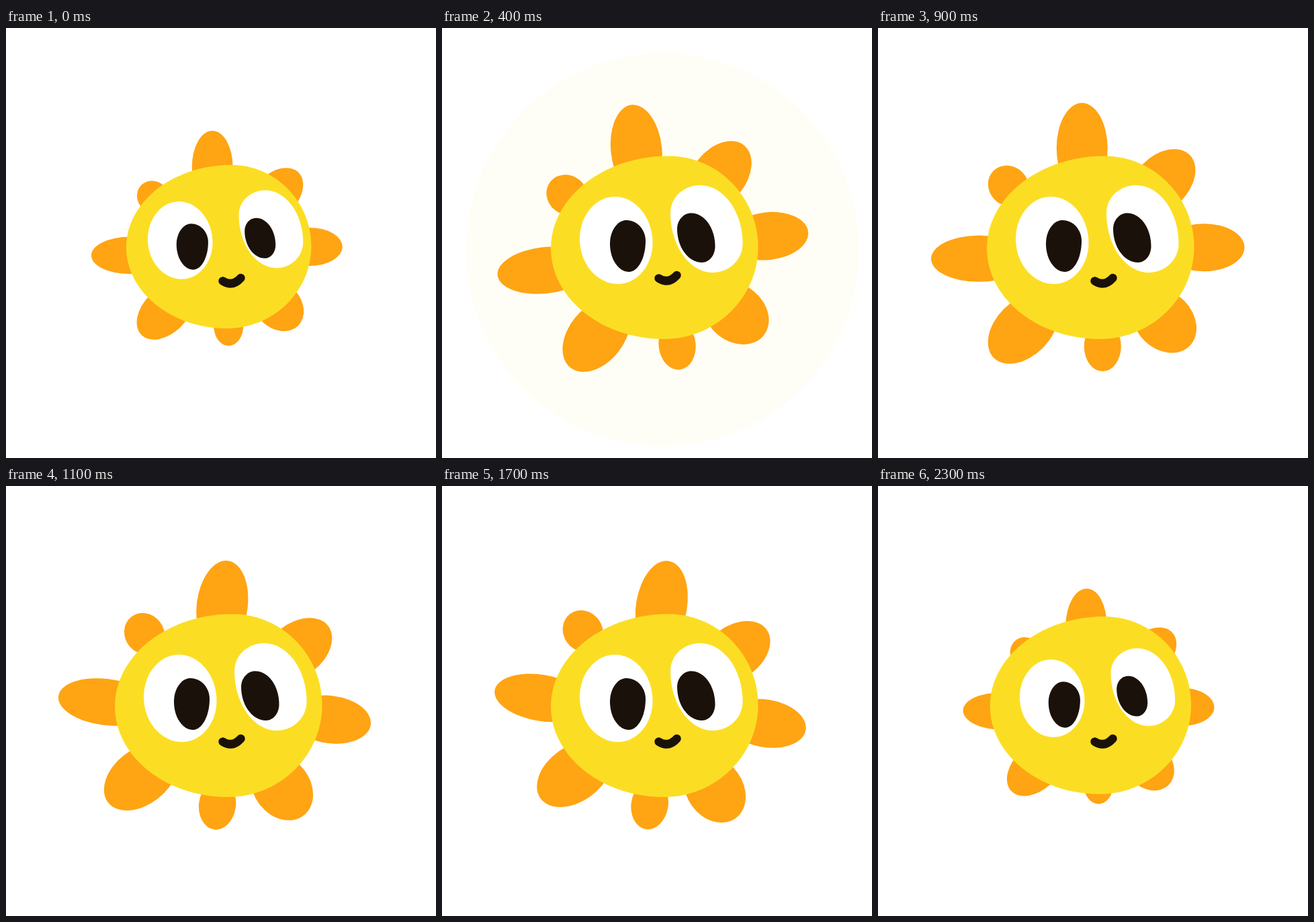
Recreate the animation shown at these times as an HTML page. Size 640 px wide and 640 px high, loop 2400 ms.

```html
<!DOCTYPE html>
<html lang="en">
<head>
<meta charset="utf-8">
<title>Sun</title>
<style>
  html, body { margin: 0; width: 100%; height: 100%; overflow: hidden; background: #fff; }
  svg { display: block; width: 100vw; height: 100vh; }
</style>
</head>
<body>
<svg viewBox="0 0 640 640"></svg>
<script>
  const LOOP = 2400, STEP = 100;
  const YELLOW = '#fbde23', ORANGE = '#ffa413', BLACK = '#1b110b';
  const svg = document.querySelector('svg');

  function set(el, attrs) {
    for (const key in attrs) el.setAttribute(key, attrs[key]);
  }

  function add(tag, attrs, parent = svg) {
    const el = document.createElementNS('http://www.w3.org/2000/svg', tag);
    set(el, attrs);
    return parent.appendChild(el);
  }

  // A lopsided oval given by its four extreme points.
  function oval(fill, top, right, bottom, left) {
    const k = 0.55;
    const mix = (a, b) => a + (b - a) * k;
    const quarter = (p, q, corner) =>
      `C${mix(p[0], corner[0])} ${mix(p[1], corner[1])} ${mix(q[0], corner[0])} ${mix(q[1], corner[1])} ${q}`;
    const d = `M${top}`
      + quarter(top, right, [right[0], top[1]])
      + quarter(right, bottom, [right[0], bottom[1]])
      + quarter(bottom, left, [left[0], bottom[1]])
      + quarter(left, top, [left[0], top[1]]);
    return add('path', { d, fill });
  }

  const halo = add('circle', { fill: YELLOW });

  // Centre, length and half width; each ray points 45 degrees past the one before.
  const rays = add('g', { fill: ORANGE });
  [
    [485, 327, 60.5, 35.5],
    [426, 436, 53, 42],
    [334, 474, 37, 27.5],
    [216, 447, 62, 41],
    [150, 343, 71, 34.5],
    [194.5, 235, 32, 29],
    [304, 179, 67.5, 38],
    [423, 230, 58, 39.5]
  ].forEach(([x, y, rx, ry], i) =>
    add('ellipse', { rx, ry, transform: `translate(${x} ${y}) rotate(${i * 45})` }, rays));

  const body = oval(YELLOW, [337, 190.5], [470.5, 326], [330, 463], [162, 328]);
  const eyeL = oval('#fff', [257, 251], [313.5, 320], [262, 381], [205, 314]);
  const eyeR = oval('#fff', [384, 234], [447.5, 321], [403, 364], [340, 275]);
  const pupilL = oval(BLACK, [274.5, 286], [303, 317], [278, 363], [250, 321]);
  const pupilR = oval(BLACK, [371, 275.5], [406.5, 325], [387, 349], [350, 299]);
  const mouth = add('path', {
    d: 'M322.5 376.5Q337 386 349.5 372',
    fill: 'none', stroke: BLACK, 'stroke-width': 12.5, 'stroke-linecap': 'round'
  });

  // Straight runs between [ms, value] points.
  function follow(t, points) {
    const i = points.findIndex(p => p[0] > t);
    const [t0, a] = points[i - 1], [t1, b] = points[i];
    return a + (b - a) * (t - t0) / (t1 - t0);
  }

  // Smooth bump from 0 to 1 and back, wrapping around the loop.
  function bump(t, centre, half) {
    const gap = Math.abs(t - centre);
    const near = Math.min(gap, LOOP - gap, half);
    return Math.cos(near / half * Math.PI / 2) ** 2;
  }

  function place(el, x, y, scale, turn = 0) {
    set(el, { transform: `translate(${x} ${y}) rotate(${turn}) scale(${scale}) translate(${-x} ${-y})` });
  }

  function draw(t) {
    const r = 51 + 0.605 * t;
    set(halo, {
      cx: 320 + 0.028 * r, cy: 320 + 0.0345 * r, r,
      opacity: Math.max(0, 0.52 - 0.0012 * t)
    });

    const squeeze = bump(t, 2350, 250);
    const eye = 1 - 0.122 * squeeze;
    const spin = follow(t, [[0, 0], [640, -9.6], [1300, 14.5], [LOOP, 0]]);
    place(rays, 320, 320, 1 - 0.22 * squeeze, spin);
    place(body, 320, 315, 1 - 0.108 * bump(t, 10, 170));
    place(eyeL, 259, 316, eye);
    place(eyeR, 399, 302, eye);
    place(pupilL, 284, 333, eye);
    place(pupilR, 378, 315, 1 - 0.205 * squeeze);

    const lift = follow(t, [[0, 0], [600, -6], [1100, 4], [LOOP, 4]]);
    set(mouth, { transform: `translate(0 ${lift})` });
  }

  const start = performance.now();
  function tick() {
    const t = (performance.now() - start) % LOOP;
    draw(Math.floor(t / STEP) * STEP);
    requestAnimationFrame(tick);
  }
  tick();
</script>
</body>
</html>
```
